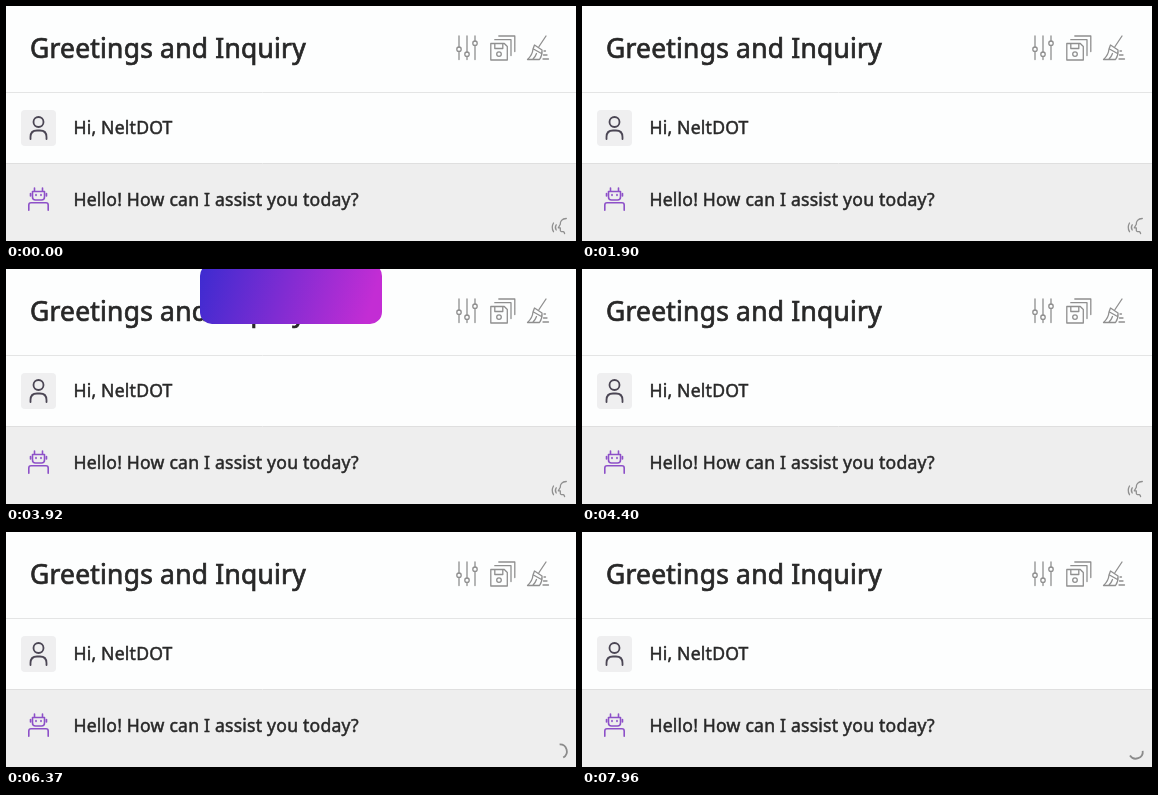
These frames come from a looping animation (570x235 px, 8000 ms). An HTML page:

```html
<!DOCTYPE html>
<html lang="en">
<head>
<meta charset="utf-8">
<title>Chat</title>
<style>
  html, body { margin: 0; width: 100%; height: 100%; overflow: hidden; background: #fdfefe; }
  svg { display: block; }
  /* The thin outline gives the regular face a medium weight. */
  text {
    font: 17.6px "Noto Sans", "Open Sans", sans-serif;
    letter-spacing: .012em;
    fill: #282828; stroke: #282828; stroke-width: .028em;
  }
  .title { font-size: 26.4px; letter-spacing: .009em; }
  .icon { fill: none; stroke: #8f8f8f; stroke-width: 1.3; stroke-linecap: round; stroke-linejoin: round; }
  #toolbar rect { filter: drop-shadow(0 0 3px #8fe3ee); }
</style>
</head>
<body>
<svg width="570" height="235" viewBox="0 0 570 235">
  <defs>
    <linearGradient id="violet" x1="0" y1="0" x2="1" y2=".1">
      <stop offset="0" stop-color="#3c2bd0"/>
      <stop offset="1" stop-color="#c32dd4"/>
    </linearGradient>
    <g id="speak">
      <path d="M15 1.5C10.5 1.5 8.8 4.5 9 7.3L7 10.8H9V13.3Q9 15 12 14.6Q13 15 13.3 16.5M4.9 7.8Q3.2 10.3 4.9 13M2.2 6Q-.4 10.4 2.2 14.7"/>
    </g>
    <g id="save">
      <path d="M.5 8H14L17 11V24.5H.5ZM4.5 8V13H12.5V8M4.5 4.2H20.7V20M8.5 .5H24.5V16"/>
      <circle cx="8.7" cy="18.6" r="2.3"/>
    </g>
  </defs>

  <rect y="158" width="570" height="77" fill="#eeeeee"/>
  <path d="M0 86.5H570" stroke="#e4e5e5"/>
  <path d="M0 157.5H570" stroke="#dfdfdf"/>

  <text class="title" x="24" y="52">Greetings and Inquiry</text>
  <text x="67.4" y="128">Hi, NeltDOT</text>
  <text x="67.4" y="200">Hello! How can I assist you today?</text>

  <!-- header icons -->
  <g class="icon">
    <path d="M453 30V41M453 45.4V53.5M461 30V46M461 50.4V53.5M469 30V35M469 39.4V53.5"/>
    <circle cx="453" cy="43.2" r="2.2"/>
    <circle cx="461" cy="48.2" r="2.2"/>
    <circle cx="469" cy="37.2" r="2.2"/>
    <use href="#save" x="484.3" y="29.5"/>
    <path d="M540 30L533 40.5M528.5 39L536 44Q536.5 49 533.5 53.5H521.5Q526.5 49 527 43ZM527.5 43L535.5 47.5M527 53Q529.5 50.5 530.5 47.5M538 45H539.5M537.5 49H541M537 53H542.5"/>
  </g>

  <!-- avatars -->
  <rect x="15" y="104" width="35" height="36" rx="4" fill="#efeff0"/>
  <g class="icon" style="stroke:#4b4654;stroke-width:1.8">
    <circle cx="32.5" cy="116" r="5"/>
    <path d="M24.5 133V131Q24.5 124.5 31 124.5H34Q40.5 124.5 40.5 131V133"/>
  </g>
  <g class="icon" style="stroke:#8d50c8;stroke-width:1.6">
    <path d="M28.5 182V185M36.5 182V185M26.5 185.5H38.5V191Q38.5 194 35.5 194H29.5Q26.5 194 26.5 191ZM24.5 187.5V190M40.5 187.5V190M30 188.5V189.5M35 188.5V189.5M22.8 204.3V199Q22.8 196.8 25 196.8H40Q42.2 196.8 42.2 199V204.3"/>
  </g>

  <g id="toolbar">
    <rect x="412" y="97" width="149" height="26" rx="13" fill="#fdfefe" stroke="#c9eef2"/>
    <path d="M443.5 104V117M471.5 104V117M500.5 104V117M529.5 104V117" stroke="#eceeee"/>
    <g class="icon">
      <path d="M435 105.5A6.7 6.7 0 1 0 436.7 111M435.8 102V106.3H431.5"/>
      <path d="M452 112.5L461 103.2L464 106.2L455 115L451 116ZM459 105.2L462 108.2M450.5 118H465.5"/>
      <use id="rowSpeak" href="#speak" x="478" y="101.5"/>
      <use href="#save" transform="translate(506.5 101.5) scale(.68)"/>
      <path d="M537 104.5H550M541 104.5V102.5H546V104.5M538.5 105V117.5H548.5V105M541.8 108V114.5M545.2 108V114.5"/>
    </g>
  </g>

  <use id="cornerSpeak" class="icon" href="#speak" x="545.3" y="211"/>
  <path id="spinner" d="M1.8 -6.8A7 7 0 0 1 1.8 6.8" fill="none" stroke="#8b8b8b" stroke-width="1.8"/>
  <rect id="toast" x="194" y="-60" width="182" height="60" rx="12" fill="url(#violet)"/>
  <path id="cursor" d="M0 0V13.2L3 10.4L5.3 16L7.8 15L5.5 9.6H9.6Z" stroke="#fff" stroke-width=".7"/>
</svg>
<script>
const LOOP = 8000, STEP = 68.5;
const get = id => document.getElementById(id);
const [toolbar, rowSpeak, cornerSpeak, spinner, toast, cursor] =
  ["toolbar", "rowSpeak", "cornerSpeak", "spinner", "toast", "cursor"].map(get);

const show = (el, on) => el.style.display = on ? "" : "none";
const darken = (el, on) => el.style.stroke = on ? "#303030" : "";
const place = (el, x, y, turn = 0) =>
  el.setAttribute("transform", `translate(${x} ${y}) rotate(${turn})`);
const ease = p => p * p * (3 - 2 * p);

// Pointer visits: [start, end, from, to]; each holds its end until the next.
const moves = [
  [330, 750, [553, 209], [491, 112]],
  [1020, 1160, [491, 112], [490, 110]],
  [1230, 1760, [490, 110], [500, 96]],
  [5130, 5630, [567, 187], [557, 225]],
  [5960, 6240, [557, 225], [557, 240]]
];

// Motion advances in discrete steps counted from its own start.
const stepped = (t, start) => STEP * Math.floor((t - start) / STEP + 0.02);

function pointerAt(t) {
  if (t < 330 || (t >= 1830 && t < 5130) || t >= 6240) return null;
  const [start, end, from, to] = moves.filter(m => t >= m[0]).pop();
  const p = ease(Math.min(1, stepped(t, start) / (end - start - 20)));
  return from.map((v, i) => v + (to[i] - v) * p);
}

function draw(t) {
  const pointer = pointerAt(t);
  show(cursor, pointer);
  if (pointer) place(cursor, ...pointer);

  const overRow = pointer && pointer[1] < 157;
  const fading = t >= 1830 && t < 1900;
  show(toolbar, overRow || fading);
  toolbar.style.opacity = fading ? 0.4 : 1;
  darken(rowSpeak, overRow && pointer[0] < 496 && pointer[1] > 100);

  const loading = t >= 5960;
  show(cornerSpeak, !loading);
  darken(cornerSpeak, pointer && pointer[1] > 211);
  show(spinner, loading);
  place(spinner, 553.7, 219.5, -40 + stepped(t, 7000) * 360 / 735);

  const dropping = t >= 3570 && t < 4400;
  show(toast, dropping);
  if (dropping) place(toast, 0, 55 * Math.sin(Math.PI * (stepped(t, 3570) + 60) / 840));
}

function frame() {
  draw(performance.now() % LOOP);
  requestAnimationFrame(frame);
}
frame();
</script>
</body>
</html>
```
